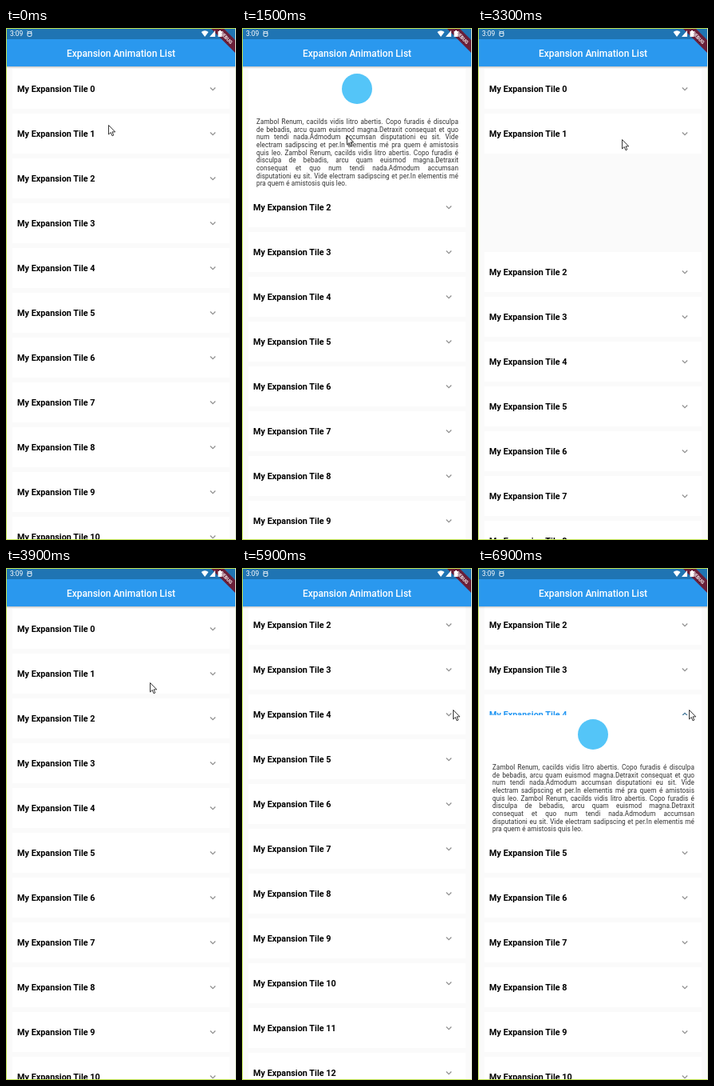
An HTML page for the animation above (7000 ms loop, 288 px wide and 640 px high).

```html
<!DOCTYPE html>
<html lang="en">
<head>
<meta charset="utf-8">
<title>Expansion Animation List</title>
<style>
  html, body { margin: 0; width: 100%; height: 100%; overflow: hidden; }
  body { font-family: Roboto, sans-serif; }
  #stage { position: relative; width: 288px; height: 640px; overflow: hidden; background: #fafafa; }
  #stage div, #stage svg { position: absolute; }
  #list { left: 0; top: 48px; width: 288px; height: 592px; overflow: hidden; }
  .tile { left: 8px; top: -48px; width: 272px; height: 0; }
  .card { top: -25px; width: 100%; height: 50px; background: #fff; }
  .title { left: 6px; top: -9px; font: 700 10.85px/20px Roboto, sans-serif; white-space: nowrap; color: #000; }
  .chevron { left: 246px; top: -5px; width: 10px; height: 10px; fill: none; stroke: #8e8e8e; stroke-width: 1.1; }
  .open .title { color: #2196f3; }
  .open .chevron { stroke: #3f7396; }
  .content { top: 20px; width: 100%; height: 148px; background: #fff; }
  .logo { left: 117px; top: 5px; width: 38px; height: 38px; border-radius: 50%; background: #54c5f8; }
  #stage .text { left: 10px; top: 61px; width: 253px; font-size: 8.2px; letter-spacing: .08px; color: #303030; }
  #stage .text p { margin: 0; height: 9.67px; line-height: 9.67px; white-space: nowrap; text-align: justify; text-align-last: justify; }
  #stage .text p:last-child { text-align-last: left; }
  #bar { left: 0; top: 0; width: 288px; height: 48px; background: #2a98ee; box-shadow: 0 1px 2px #0004; }
  #status { width: 288px; height: 14px; background: #1f74b3; }
  #heading { top: 22px; width: 288px; text-align: center; font: 500 12px/20px Roboto, sans-serif; color: #fff; }
  #clock { left: 5px; top: 2px; font-size: 8.5px; line-height: 11px; color: #fff; }
  #edge { inset: 0; border: 1px solid #bfe04f; border-right-color: #dde6cc; }
</style>
</head>
<body>
<div id="stage">
  <div id="list"></div>
  <div id="bar">
    <div id="status"></div>
    <div id="heading">Expansion Animation List</div>
    <div id="clock">3:09</div>
    <svg width="288" height="48">
      <path d="M256 0H272L288 16V32Z" fill="#6a1f38"/>
      <text transform="translate(276 12) rotate(45)" y="2.2" text-anchor="middle" font-size="6" font-weight="700" fill="#fff">DEBUG</text>
      <rect x="27" y="4.5" width="5" height="6" rx="1.5" fill="none" stroke="#fff" stroke-width=".9"/>
      <path d="M27 6.5H32M26.5 3.5L28 5M32.5 3.5L31 5" stroke="#fff" stroke-width=".8"/>
      <path d="M244.500 5Q249 1.500 253.500 5L249 11ZM255 11L262 3V11ZM265.500 4H267V3H269V4H270.500V11H265.500Z" fill="#fff"/>
    </svg>
  </div>
  <div id="edge"></div>
  <svg id="cursor" width="12" height="17">
    <path d="M.5 .5V12L3.200 9.500L5 13.800L6.800 13L5 8.900H8.700Z" fill="#fff" stroke="#222" stroke-width=".9"/>
  </svg>
</div>
<script>
const LOOP = 7000, STEP = 100, GROW = 770, FULL = 146, SLIDE = 136, SCROLL = 117;
const lines = [
  "Zambol Renum, cacilds vidis litro abertis. Copo furadis é disculpa",
  "de bebadis, arcu quam euismod magna.Detraxit consequat et quo",
  "num tendi nada.Admodum accumsan disputationi eu sit. Vide",
  "electram sadipscing et per.In elementis mé pra quem é amistosis",
  "quis leo. Zambol Renum, cacilds vidis litro abertis. Copo furadis é",
  "disculpa de bebadis, arcu quam euismod magna.Detraxit",
  "consequat et quo num tendi nada.Admodum accumsan",
  "disputationi eu sit. Vide electram sadipscing et per.In elementis mé",
  "pra quem é amistosis quis leo."
];

// Pointer keys: time, x, y
const pointer = [
  [0, 128, 121], [700, 131, 134], [2300, 131, 134], [2900, 180, 139], [3850, 180, 139],
  [4400, 175, 315], [4536, 175, 315], [5290, 175, 198], [5800, 264, 177], [LOOP, 264, 177]
];

const list = document.getElementById("list");
const cursor = document.getElementById("cursor");
cursor.style.left = cursor.style.top = 0;
const tiles = Array.from({ length: 14 }, (_, i) => {
  const el = document.createElement("div");
  el.className = "tile";
  el.innerHTML = `<div class="card"></div><div class="title">My Expansion Tile ${i}</div>
    <svg class="chevron" viewBox="0 0 10 10"><path d="M1.800 3.500L5 6.700L8.200 3.500"/></svg>
    <div class="content"><div class="logo"></div>
    <div class="text">${lines.map(line => `<p>${line}</p>`).join("")}</div></div>`;
  list.append(el);
  const [card, , chevron, content] = el.children;
  return { el, card, chevron, content };
});

function ease(t, start, duration) {
  const s = Math.min(1, Math.max(0, (t - start) / duration));
  return s * s * (3 - 2 * s);
}

function pointerAt(t) {
  const next = pointer.findIndex(key => key[0] > t);
  const [a, b] = [pointer[next - 1], pointer[next]];
  const k = ease(t, a[0], b[0] - a[0]);
  return [1, 2].map(c => Math.round(a[c] + (b[c] - a[c]) * k));
}

function render(t) {
  const [active, start] = t < 6000 ? [1, 1250] : [4, 6350];
  const closing = t < 6000 ? ease(t, 3078, GROW) : 0;
  const grow = ease(t, start, GROW) - closing;
  const height = Math.round(FULL * grow);
  const scroll = Math.round(SCROLL * ease(t, 4536, 754));

  tiles.forEach(({ el, card, chevron, content }, i) => {
    const open = i === active && grow > 0 && closing === 0;
    const y = 76 + 56 * i - scroll + (i > active ? height : 0);
    el.style.transform = `translateY(${y}px)`;
    el.classList.toggle("open", open);
    card.style.height = 50 + (open ? height : 0) + "px";
    chevron.style.transform = `rotate(${open ? 180 * Math.min(1, 2 * grow) : 0}deg)`;
    content.style.display = open ? "block" : "none";
    content.style.transform = `translateY(${Math.min(0, height - SLIDE)}px)`;
  });

  const [x, y] = pointerAt(t);
  cursor.style.transform = `translate(${x}px, ${y}px)`;
}

const begin = performance.now();
function tick() {
  const t = (performance.now() - begin) % LOOP;
  render(Math.floor(t / STEP) * STEP);
  requestAnimationFrame(tick);
}
tick();
</script>
</body>
</html>
```
